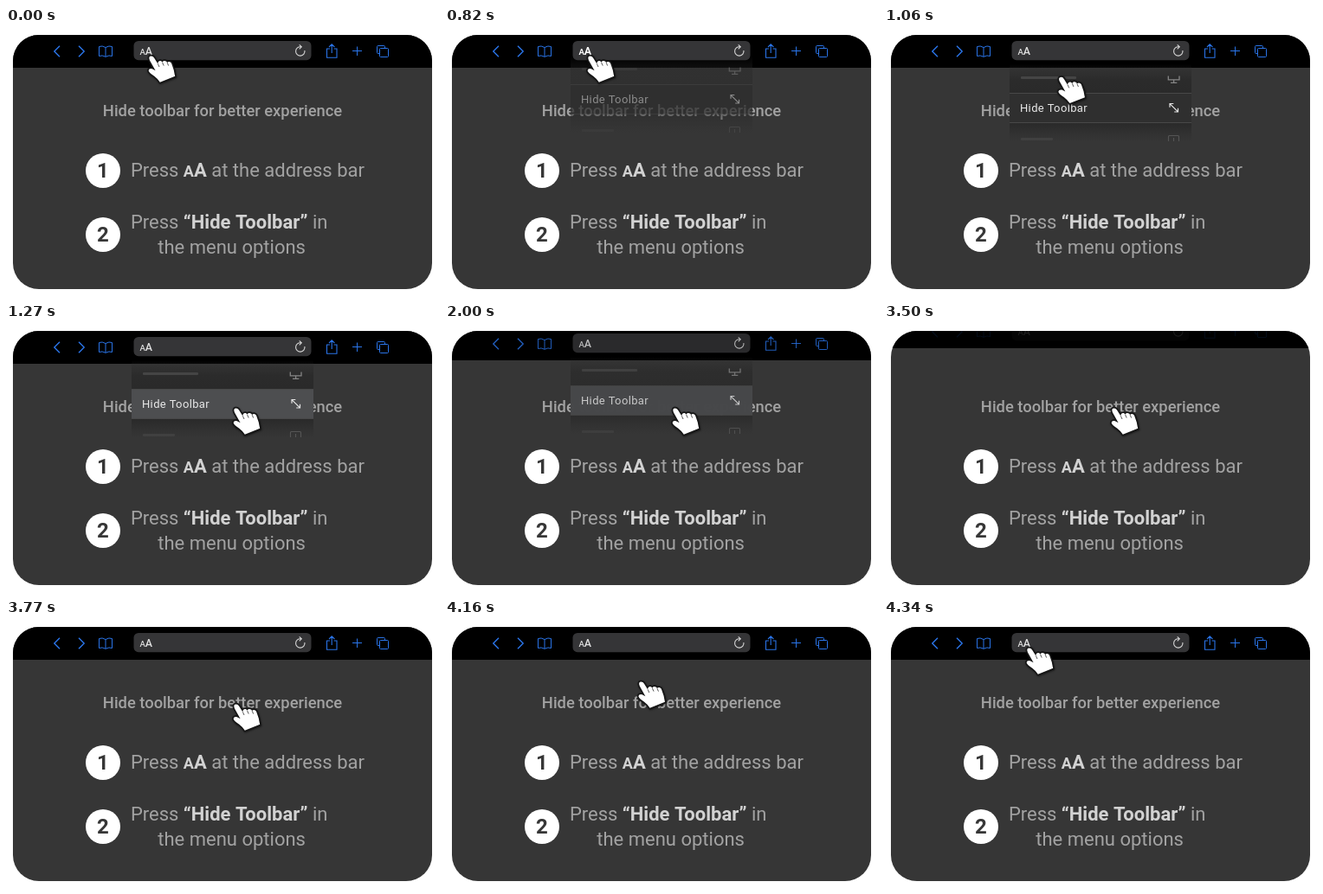
An HTML page with a canvas for the animation above (4.41 s loop, 500x310 px).

```html
<!DOCTYPE html>
<html lang="en">
<head>
<meta charset="utf-8">
<title>Hide toolbar hint</title>
<style>
  html, body { margin: 0; width: 100%; height: 100%; overflow: hidden; background: #fff; }
  canvas { display: block; width: 500px; height: 310px; }
</style>
</head>
<body>
<canvas id="stage"></canvas>
<script>
const LOOP = 4410, STEP = 30;
const BLUE = '#2a74e8', PANEL = '#363636';
const canvas = document.getElementById('stage');
const dpr = window.devicePixelRatio || 1;
canvas.width = 500 * dpr;
canvas.height = 310 * dpr;
const c = canvas.getContext('2d');

// Linear progress in whole steps; the first step already moves
const ramp = (t, start, steps) =>
  Math.min(1, Math.max(0, (Math.floor((t - start) / STEP) + 1) / steps));

function text(str, x, y, size, weight, color, spacing = 0) {
  c.font = `${weight} ${size}px Roboto, Arial, sans-serif`;
  c.letterSpacing = spacing + 'px';
  c.fillStyle = color;
  c.fillText(str, x, y);
  return x + c.measureText(str).width;
}

function box(x, y, w, h, r, color) {
  c.fillStyle = color;
  c.beginPath();
  c.roundRect(x, y, w, h, r);
  c.fill();
}

function stroke(d, color, width = 1.1) {
  c.strokeStyle = color;
  c.lineWidth = width;
  c.stroke(new Path2D(d));
}

function layer(alpha, dx, dy, draw) {
  if (alpha <= 0) return;
  c.save();
  c.globalAlpha = alpha;
  c.translate(dx, dy);
  draw();
  c.restore();
}

function bullet(n, y) {
  c.fillStyle = '#fff';
  c.beginPath();
  c.arc(112, y, 20, 0, Math.PI * 2);
  c.fill();
  c.textAlign = 'center';
  text(n, 112, y + 7.8, 24, 700, PANEL);
  c.textAlign = 'left';
}

function content() {
  const soft = '#a2a2a2', strong = '#d2d2d2';
  c.textAlign = 'center';
  text('Hide toolbar for better experience', 250, 102, 18.35, 500, soft);
  c.textAlign = 'left';
  bullet('1', 165);
  bullet('2', 239);

  let x = text('Press ', 143.9, 172, 22, 400, soft);
  x = text('A', x, 172, 18, 700, strong);
  x = text('A', x, 172, 22, 700, strong);
  text(' at the address bar', x, 172, 22, 400, soft);

  x = text('Press ', 143.9, 232, 22, 400, soft);
  x = text('“Hide Toolbar”', x, 232, 22, 700, strong);
  text(' in', x, 232, 22, 400, soft);
  text('the menu options', 175.3, 261, 22, 400, soft);
}

function menu(lit) {
  const fade = c.createLinearGradient(0, 42, 0, 131);
  fade.addColorStop(0, 'rgba(42,42,42,0)');
  fade.addColorStop(0.2, 'rgba(42,42,42,.9)');
  fade.addColorStop(0.37, '#2a2a2a');
  fade.addColorStop(0.76, '#2a2a2a');
  fade.addColorStop(1, 'rgba(42,42,42,0)');
  c.fillStyle = fade;
  c.fillRect(145, 42, 210, 89);

  c.fillStyle = '#2f2f2f';
  c.fillRect(145, 76, 210, 33);
  c.fillStyle = `rgba(77,78,80,${lit})`;
  c.fillRect(145, 76, 210, 33);
  c.fillStyle = '#484848';
  c.fillRect(145, 75, 210, 1);
  c.fillRect(145, 109, 210, 1);

  // Cut-off neighbours above and below
  box(158, 56, 64, 3, 1, '#454545');
  box(158, 127, 37, 3, 1, '#404040');
  stroke('M328.3 55.5V59.8H341V55.5M334.6 60V63M331 63.4H338.3', '#858585', 1.3);
  stroke('M328.5 131V125.5Q328.5 124.5 329.5 124.5H339.5Q340.5 124.5 340.5 125.5V131M334.5 127V131', '#555');

  text('Hide Toolbar', 157, 97, 13, 400, '#e8e8e8', 0.35);
  stroke('M330 91.8V87.5H334.3M330.3 87.8L339.2 96.7M339.5 92.7V97H335.2', '#e4e4e4', 1.2);
}

function toolbar(pressed) {
  box(147.5, 15, 205, 22.2, 5.5, '#353537');
  const weight = pressed ? 700 : 500, ink = pressed ? '#fff' : '#dedede';
  const x = text('A', 154.4, 30.6, 9.6, weight, ink);
  text('A', x, 30.6, 12.4, weight, ink);

  stroke('M344.9 26A5.2 5.2 0 1 1 340.6 21.8M338.7 19.3L341.3 21.8L338.7 24.3', '#d6d6d6');

  stroke('M62 20.7L55.8 27L62 33.3M84 20.7L90.2 27L84 33.3', BLUE, 1.4);
  stroke('M115 22.5Q111 20 107.5 21.5V32.5Q111 31 115 33.3Q119 31 122.5 32.5V21.5Q119 20 115 22.5V33', BLUE, 1);
  stroke('M374 24H370.5V34.3H382V24H378.5M376.2 29V19M373 22L376.2 18.8L379.4 22', BLUE);
  stroke('M405.5 21.5V32M400 26.5H411', BLUE, 1);
  stroke('M431 29.5H429.5Q428.5 29.5 428.5 28.5V21.5Q428.5 20.5 429.5 20.5H436.5Q437.5 20.5 437.5 21.5V23.5', BLUE, 1);
  stroke('M432.5 23.5H440.5Q441.5 23.5 441.5 24.5V32.5Q441.5 33.5 440.5 33.5H432.5Q431.5 33.5 431.5 32.5V24.5Q431.5 23.5 432.5 23.5Z', BLUE, 1);
}

const handShape = new Path2D(
  'M264 102.4Q262.2 98.3 265 97.5Q267.6 96.9 269.2 99.8L273.4 106.6' +
  'C273 102.6 277.2 102 278.6 104.8C279.2 102.2 283 102.2 284.2 105.1' +
  'C285.6 103.3 288.6 103.9 289.4 106.8L291.8 113.8Q292.4 117.4 293.2 120.8' +
  'L275.8 127.7Q273.4 123.8 269 120.5Q263.4 117.2 262.6 114.3Q263 111.4 266.8 112.2L270.6 114.2Z');

function hand() {
  c.lineJoin = 'round';
  c.save();
  c.shadowColor = 'rgba(0,0,0,.5)';
  c.shadowBlur = 2 * dpr;
  c.shadowOffsetX = 0.6 * dpr;
  c.shadowOffsetY = dpr;
  c.strokeStyle = '#161616';
  c.lineWidth = 3.4;
  c.stroke(handShape);
  c.restore();
  c.fillStyle = '#fff';
  c.fill(handShape);
  stroke('M273.4 106.4L275 110M278.6 104.9L280.2 108.6M284.2 105.2L285.7 108.6', '#444', 0.9);
}

function render(t) {
  const hide = ramp(t, 1970, 10), show = ramp(t, 3500, 10);
  const bar = 1 - hide + show;
  const lift = -20 * (1 - bar);
  const open = ramp(t, 700, 10);
  const lit = ramp(t, 1240, 2);
  const reach = ramp(t, 1000, 8) - ramp(t, 4070, 10);

  c.setTransform(dpr, 0, 0, dpr, 0, 0);
  c.fillStyle = '#fff';
  c.fillRect(0, 0, 500, 310);
  c.save();
  c.beginPath();
  c.roundRect(8, 8, 484, 294, 30);
  c.clip();
  c.fillStyle = PANEL;
  c.fillRect(8, 8, 484, 294);
  c.fillStyle = '#000';
  c.fillRect(8, 8, 484, 38 + lift);
  content();
  layer(open * (1 - hide), 0, -20 * (1 - open + hide), () => menu(lit));
  layer(bar, 0, lift, () => toolbar(t >= 330 && t < 1000));
  layer(1, -98 * (1 - reach), -65 * (1 - reach), hand);
  c.restore();
}

const start = performance.now();
function tick() {
  render((performance.now() - start) % LOOP);
  requestAnimationFrame(tick);
}
tick();
</script>
</body>
</html>
```
